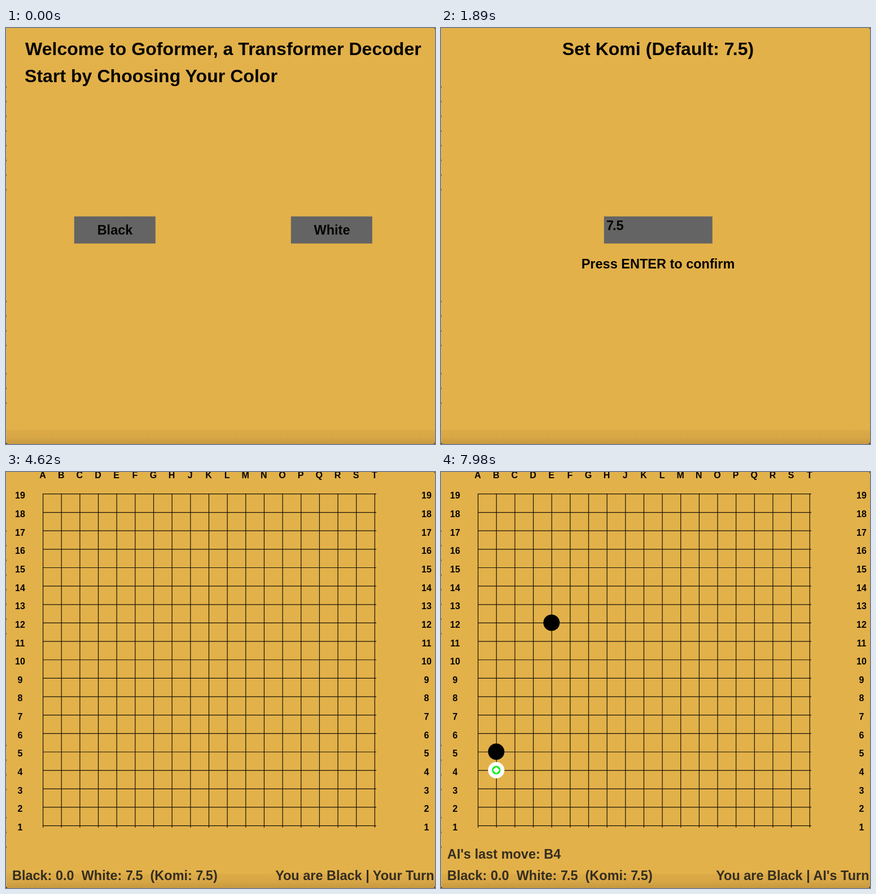
Animation, 760 px wide and 737 px high, one loop 8 s. Source, as an HTML page:

```html
<!DOCTYPE html>
<html lang="en">
<head>
<meta charset="utf-8">
<title>Goformer</title>
<style>
  html, body { margin: 0; width: 100%; height: 100%; overflow: hidden; background: #e2b14a; }
  svg { display: block; width: 760px; height: 737px; }
  text { font-family: "Liberation Sans", Arial, sans-serif; font-weight: bold; white-space: pre; fill: #050400; }
  .title { font-size: 32px; letter-spacing: .04px; }
  .body { font-size: 23.5px; }
  .status { font-size: 23.4px; letter-spacing: .04px; fill: #342d20; }
  .label { font-size: 16px; text-anchor: middle; }
  .mid { text-anchor: middle; }
  .end { text-anchor: end; }
  .button { fill: #646464; }
  .grid { stroke: #1a1407; stroke-width: 1.2; }
</style>
</head>
<body>
<svg id="stage" viewBox="0 0 760 737">
  <defs>
    <linearGradient id="shade" x1="0" y1="0" x2="0" y2="1">
      <stop offset="0" stop-color="#dcab47"/>
      <stop offset=".5" stop-color="#d8a745"/>
      <stop offset="1" stop-color="#c79940"/>
    </linearGradient>
  </defs>
  <rect width="760" height="737" fill="#e2b14a"/>
  <rect y="712" width="760" height="25" fill="url(#shade)"/>
</svg>
<script>
const LOOP = 8000;
const START = { komi: 280, board: 2520, first: 5530, reply: 6440, second: 7980 };
const COLS = "ABCDEFGHJKLMNOPQRST";
const STEP = 32.65, LEFT = 65.6, TOP = 38.9;
const stage = document.getElementById("stage");
const parts = [];

function add(parent, tag, attrs, content) {
  const el = document.createElementNS("http://www.w3.org/2000/svg", tag);
  for (const key in attrs) el.setAttribute(key, attrs[key]);
  if (content) el.textContent = content;
  parent.append(el);
  return el;
}

// Text with the pair "7." kerned
function text(parent, x, y, cls, content) {
  const el = add(parent, "text", { x, y, class: cls });
  content.split(/(?<=7)(?=\.)/).forEach((run, i) =>
    add(el, "tspan", i ? { dx: "-.09em" } : {}, run));
}

// A group shown from one time up to another
function scene(from, to = LOOP) {
  const el = add(stage, "g", {});
  parts.push({ el, from, to });
  return el;
}

function button(parent, x, width) {
  add(parent, "rect", { x, y: 333.8, width, height: 48, class: "button" });
}

const colX = i => LEFT + STEP * i;
const rowY = i => TOP + STEP * i;

function stone(parent, place, fill) {
  const cx = colX(COLS.indexOf(place[0])) - .4;
  const cy = rowY(19 - place.slice(1)) - .5;
  add(parent, "circle", { cx, cy, r: 14.5, fill });
  return { cx, cy };
}

// Green ring with a diamond-shaped hole
function marker(parent, { cx, cy }) {
  add(parent, "circle", { cx, cy, r: 7.6, fill: "#12ee1c" });
  add(parent, "rect", {
    x: -4.2, y: -4.2, width: 8.4, height: 8.4, rx: 1.6, fill: "#fff",
    transform: `translate(${cx} ${cy}) rotate(45)`
  });
}

function drawWelcome() {
  const g = scene(0, START.komi);
  text(g, 34, 48, "title", "Welcome to Goformer, a Transformer Decoder");
  text(g, 33, 96, "title", "Start by Choosing Your Color");
  button(g, 120.8, 144);
  button(g, 504.8, 144);
  text(g, 193, 366, "body mid", "Black");
  text(g, 577.5, 366, "body mid", "White");
}

function drawKomi() {
  const g = scene(START.komi, START.board);
  text(g, 384.5, 48, "title mid", "Set Komi (Default: 7.5)");
  button(g, 288.8, 192);
  text(g, 293, 358, "body", "7.5");
  text(g, 384.5, 425.5, "body mid", "Press ENTER to confirm");
}

function drawBoard() {
  const g = scene(START.board);
  for (let i = 0; i < 19; i++) {
    const x = colX(i), y = rowY(i);
    add(g, "path", { d: `M${x} 38.3V630M65 ${y}H656`, class: "grid" });
    text(g, x - .5, 11, "label", COLS[i]);
    for (const side of [25, 745]) text(g, side, y + 8.4, "label", String(19 - i));
  }
  text(g, 11, 723, "status", "Black: 0.0  White: 7.5  (Komi: 7.5)");
}

function drawTurn(who, from, to) {
  text(scene(from, to), 758.5, 723, "status end", `You are Black | ${who} Turn`);
}

function drawMoves() {
  stone(scene(START.first), "E12", "#000");
  const reply = scene(START.reply);
  marker(reply, stone(reply, "B4", "#fff"));
  text(reply, 11, 684.5, "status", "AI's last move: B4");
  stone(scene(START.second), "B5", "#000");
}

// Thin strip of the desktop along the left side, and the window corners
function drawEdge() {
  add(stage, "rect", { width: 1, height: 737, fill: "#c8b58c" });
  const ticks = [[104, 8], [484, 4], [612, 3]];
  for (const [y, count] of ticks)
    for (let i = 0; i < count; i++)
      add(stage, "rect", { y: y + 26 * i - 1, width: 1, height: 3, fill: "#655a3e" });
  add(stage, "path", { d: "M757 0H760V3Q760 0 757 0M760 733V737H756Q760 737 760 733M0 733V737H4Q0 737 0 733", fill: "#1c1a14" });
}

drawWelcome();
drawKomi();
drawBoard();
drawTurn("Your", START.board, START.first);
drawTurn("AI's", START.first, START.reply);
drawTurn("Your", START.reply, START.second);
drawTurn("AI's", START.second);
drawMoves();
drawEdge();

const origin = performance.now();
function frame(now) {
  const t = Math.max(0, now - origin) % LOOP;
  for (const { el, from, to } of parts)
    el.style.display = t >= from && t < to ? "" : "none";
  requestAnimationFrame(frame);
}
frame(origin);
</script>
</body>
</html>
```
